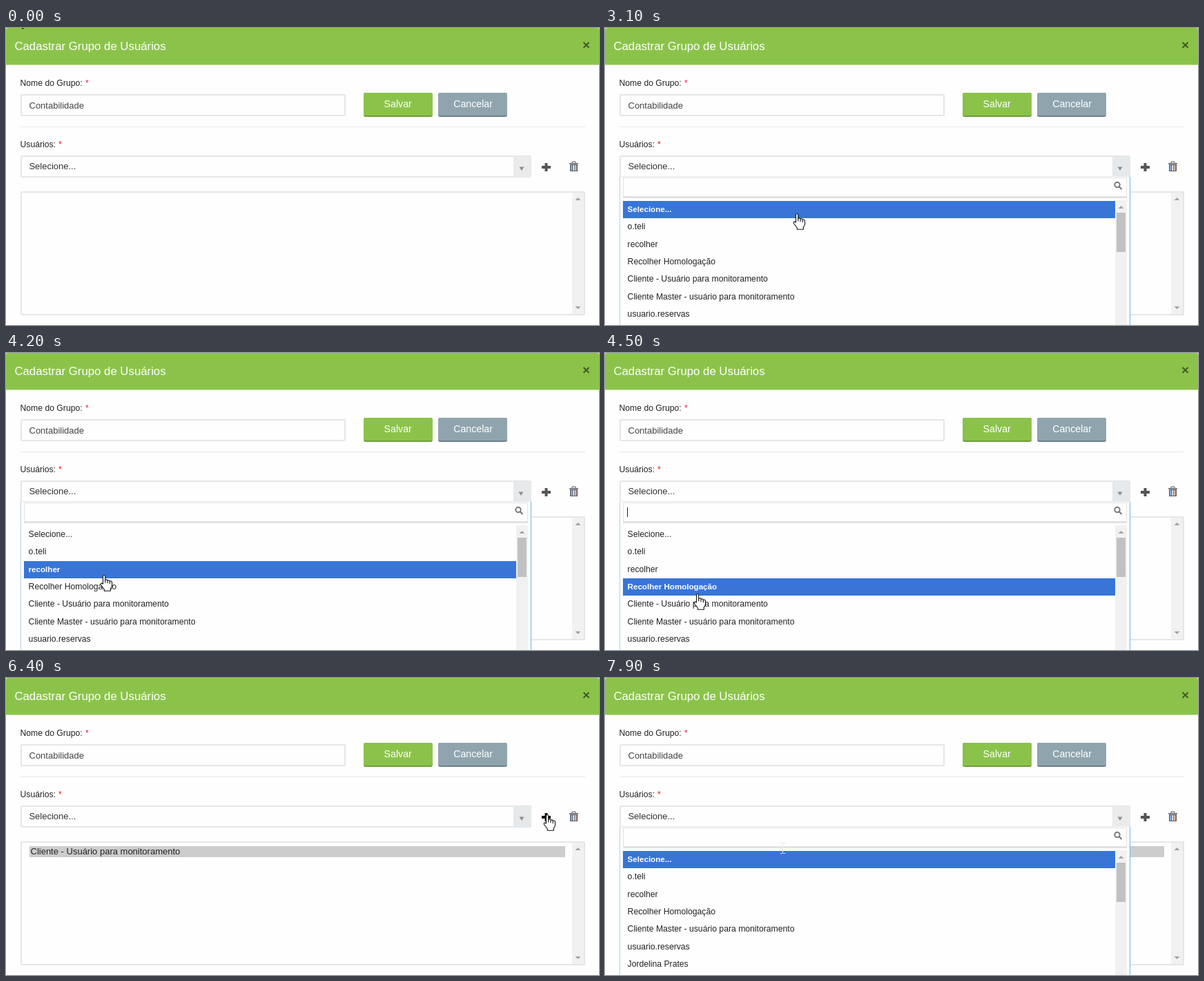
An HTML page with a canvas for the animation above (8 s loop, 859 by 431 pixels).

```html
<!DOCTYPE html>
<html lang="pt-BR">
<head>
<meta charset="utf-8">
<title>Cadastrar Grupo de Usuários</title>
<style>
html, body { margin: 0; width: 100%; height: 100%; overflow: hidden; background: #fefefe; }
canvas { display: block; width: 859px; height: 431px; }
</style>
</head>
<body>
<canvas id="stage" width="859" height="431"></canvas>
<script>
const ctx = document.getElementById('stage').getContext('2d');
const LOOP = 8000, STEP = 100;
const PAGE = '#fefefe', LINE = '#e6e6e6', INK = '#222';
const PICKED = 'Cliente - Usuário para monitoramento';
const USERS = ['Selecione...', 'o.teli', 'recolher', 'Recolher Homologação', PICKED,
  'Cliente Master - usuário para monitoramento', 'usuario.reservas', 'Jordelina Prates'];
const ROW_TOP = 251, ROW_H = 25.33;

// Pointer hotspot: time, x, y
const PATH = [
  [0, 17, -18], [100, 17, -18], [300, 7, 12], [500, 120, 75], [700, 370, 140],
  [1000, 648, 199], [1200, 746, 203], [1300, 746, 203], [1700, 773, 205], [1800, 773, 205],
  [2300, 751, 199], [2600, 751, 199], [2900, 285, 261], [3000, 285, 261], [3100, 278, 269],
  [3500, 205, 289], [3700, 205, 289], [4200, 142, 322], [4600, 131, 358], [5100, 131, 358],
  [5500, 784, 198], [6500, 784, 198], [7000, 315, 206], [7700, 315, 206], [7900, 257, 247]
];

function pointerAt(t) {
  const i = PATH.findIndex(p => p[0] > t);
  if (i < 0) return PATH[PATH.length - 1].slice(1);
  const [t0, x0, y0] = PATH[i - 1], [t1, x1, y1] = PATH[i];
  const k = (t - t0) / (t1 - t0);
  return [Math.round(x0 + (x1 - x0) * k), Math.round(y0 + (y1 - y0) * k)];
}

function rect(x, y, w, h, color) {
  ctx.fillStyle = color;
  ctx.fillRect(x, y, w, h);
}

function round(x, y, w, h, r, color) {
  ctx.fillStyle = color;
  ctx.beginPath();
  ctx.roundRect(x, y, w, h, r);
  ctx.fill();
}

function frame(x, y, w, h) {
  round(x, y, w, h, 2, LINE);
  rect(x + 2, y + 2, w - 4, h - 4, PAGE);
}

function text(str, x, y, size, color = INK, weight = '') {
  ctx.font = `${weight} ${size}px "Liberation Sans", Arial, sans-serif`;
  ctx.fillStyle = color;
  ctx.fillText(str, x, y);
}

function shape(points, color) {
  ctx.beginPath();
  points.forEach(([x, y]) => ctx.lineTo(x, y));
  ctx.closePath();
  ctx.fillStyle = color;
  ctx.fill();
}

function triangle(x, y, half, h, color) {
  shape([[x - half, y], [x + half, y], [x, y + h]], color);
}

function button(x, label, labelX, color, edge) {
  round(x, 94, 100, 35, 3, edge);
  round(x, 94, 100, 33, [3, 3, 2, 2], color);
  text(label, labelX, 115, 14.2, '#fff');
}

function plus(hover) {
  const color = hover ? '#111' : '#555';
  rect(776, 200, 13, 4, color);
  rect(780.5, 196, 4, 12, color);
}

function trash() {
  const gray = '#5c5e68';
  rect(816, 196, 13, 1.5, gray);
  rect(820, 193.5, 5, 1, gray);
  rect(819.5, 194, 1, 2, gray);
  rect(824.5, 194, 1, 2, gray);
  rect(817, 198, 11, 10, gray);
  ['#8fb4e8', '#dfe8f5', '#f0c49c'].forEach((c, i) => rect(818.3 + i * 3, 199, 2, 8, c));
}

function page(tint) {
  rect(0, 0, 859, 431, PAGE);
  round(0, 0, 859, 53, [3, 3, 0, 0], '#8bc34a');
  rect(0, 53, 859, 1, '#c9e2a9');
  text('Cadastrar Grupo de Usuários', 12.4, 32, 16.8, '#fff');
  text('×', 835, 31, 19, '#43592a', 'bold');

  text('Nome do Grupo:', 20.5, 84, 12.2);
  text('*', 115, 84, 12.2, '#f0185a');
  frame(21, 96, 471, 32);
  text('Contabilidade', 33.5, 117, 13, '#444');
  button(518, 'Salvar', 547.6, '#8bc34a', '#6f9c3b');
  button(626, 'Cancelar', 648.2, '#90a4ae', '#6b808b');
  rect(21, 143, 818, 1, LINE);

  text('Usuários:', 20.5, 173, 12.2);
  text('*', 76, 173, 12.2, '#f0181f');
  frame(21, 185, 740, 32);
  rect(735, 186, 25, 30, tint ? '#e5e9eb' : '#ebebeb');

  frame(21, 237, 818, 180);
  rect(820, 239, 17, 176, '#f1f1f1');
  triangle(828.5, 250, 4, -4, '#a3a3a3');
  triangle(828.5, 404, 4, 4, '#a3a3a3');
}

function dropdown(users, active, caret) {
  rect(22, 216, 739, 215, PAGE);
  rect(21, 216, 1, 215, '#b5d3e4');
  rect(760, 216, 1, 215, '#6bb9e6');

  rect(26, 217, 730, 30, '#e2e2e2');
  rect(27, 218, 728, 26, PAGE);
  if (caret) rect(32, 224, 1, 14, '#222');
  ctx.strokeStyle = '#777';
  ctx.lineWidth = 2;
  ctx.beginPath();
  ctx.arc(742, 227.5, 3.7, 0, 7);
  ctx.moveTo(744.8, 230.3);
  ctx.lineTo(748.5, 234);
  ctx.stroke();

  users.slice(0, 7).forEach((name, i) => {
    const y = Math.round(ROW_TOP + i * ROW_H);
    if (i === active) rect(26, y, 713, 25, '#3875d7');
    const style = i === active ? [11.6, '#fff', 'bold'] : [12.2];
    text(name, 32.6, y + 16, ...style);
  });
  rect(739, 250, 17, 181, '#f1f1f1');
  triangle(747.5, 262, 4, -4, '#a3a3a3');
  rect(741, 268, 13, 57, '#c1c1c1');
}

function tooltip() {
  rect(797, 217, 60, 20, 'rgba(0,0,0,.18)');
  rect(794, 214, 60, 20, '#767676');
  rect(795, 215, 58, 18, '#fff');
  text('Adicionar', 799, 228, 12, '#575757');
}

function outline() {
  ctx.closePath();
  ctx.fillStyle = '#fff';
  ctx.strokeStyle = '#111';
  ctx.lineWidth = 1.1;
  ctx.lineJoin = 'round';
  ctx.fill();
  ctx.stroke();
}

const cursors = {
  arrow() {
    [[.5, .5], [.5, 16.5], [4.2, 13], [6.8, 19], [9.2, 18], [6.8, 12], [11.6, 12]]
      .forEach(p => ctx.lineTo(...p));
    outline();
  },
  hand() {
    ctx.moveTo(-1.5, 13);
    ctx.lineTo(-1.5, 2);
    ctx.bezierCurveTo(-1.5, 0, 1.7, 0, 1.7, 2);
    ctx.lineTo(1.7, 7.5);
    ctx.bezierCurveTo(3, 6.3, 4.8, 6.8, 5, 8.3);
    ctx.bezierCurveTo(6.5, 7.3, 8, 7.8, 8.3, 9.3);
    ctx.bezierCurveTo(10, 8.6, 11.5, 9.5, 11.5, 11);
    ctx.lineTo(11.5, 15.5);
    ctx.quadraticCurveTo(11.3, 18, 9.3, 20);
    ctx.lineTo(9.3, 23.3);
    ctx.lineTo(.3, 23.3);
    ctx.lineTo(.3, 21);
    ctx.lineTo(-4.6, 14.5);
    ctx.bezierCurveTo(-5.6, 12.5, -3.5, 11.2, -1.5, 13);
    outline();
    ctx.beginPath();
    for (const [x, y] of [[1.7, 7.5], [5, 8.3], [8.3, 9.3]]) {
      ctx.moveTo(x, y);
      ctx.lineTo(x, y + 4);
    }
    ctx.stroke();
  },
  beam() {
    rect(-3, -8, 3, 1, '#dedede');
    rect(1, -8, 3, 1, '#dedede');
    rect(0, -7, 1, 14, '#e8e8e8');
    rect(-3, 7, 3, 1, '#e8e8e8');
    rect(1, 7, 3, 1, '#e8e8e8');
  }
};

function draw(t) {
  const [x, y] = pointerAt(t);
  const over = (l, top, r, b) => x >= l && x < r && y >= top && y < b;
  const firstOpen = t >= 2300 && t < 5000;
  const open = firstOpen || t >= 7400;
  const added = t >= 6300;
  const onPlus = over(772, 192, 798, 215);

  page(t >= 1600 && t < 7300);
  text(t >= 5000 && !added ? PICKED : 'Selecione...', 33.4, 205, 13, '#333');
  triangle(open ? 746 : 747, 201.5, 3.5, 5.5, '#8e8e8e');
  plus(onPlus);
  trash();
  if (added) {
    rect(34, 244, 776, 16, '#cdcdcd');
    text(PICKED, 35.5, 256, 13);
  }
  if (open) {
    const users = added ? USERS.filter(u => u !== PICKED) : USERS;
    const active = Math.max(0, Math.floor((y - ROW_TOP) / ROW_H));
    const age = t - (firstOpen ? 2300 : 7400);
    dropdown(users, active, age % 1000 < 500 || (firstOpen && t >= 4300));
  }
  if (t >= 6000 && t < 6200) tooltip();

  let kind = 'arrow';
  if (onPlus || over(22, 186, 761, 217) || (open && over(22, 251, 756, 431))) kind = 'hand';
  else if (over(21, 96, 492, 128) || (open && over(26, 217, 756, 251))) kind = 'beam';
  ctx.save();
  ctx.translate(x, y);
  ctx.beginPath();
  cursors[kind]();
  ctx.restore();
}

const start = performance.now();
function tick() {
  const t = (performance.now() - start) % LOOP;
  draw(Math.floor(t / STEP) * STEP);
  requestAnimationFrame(tick);
}
tick();
</script>
</body>
</html>
```
